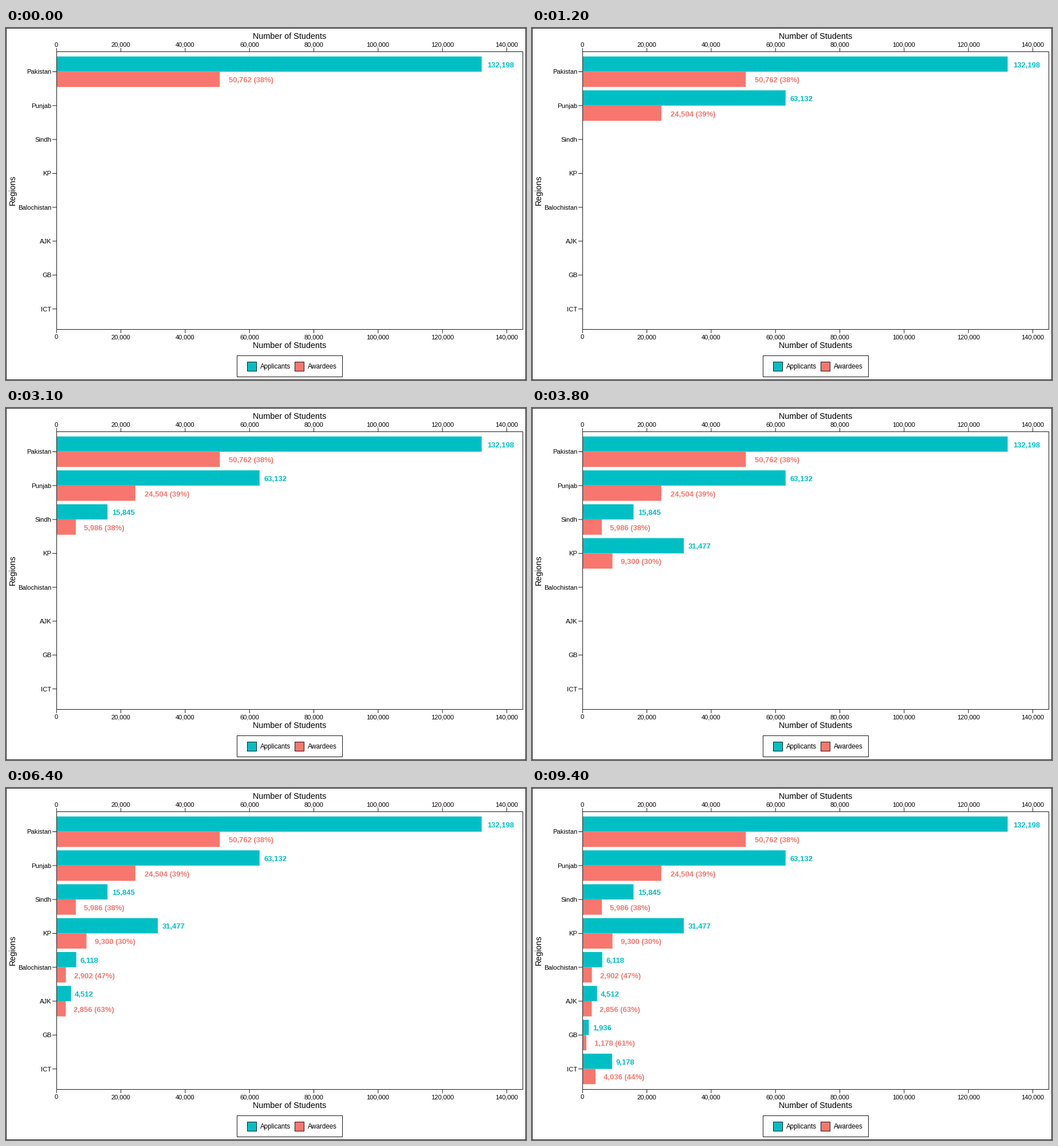
A matplotlib script that plays this animation: 908 by 616 pixels, repeating every 10000 ms.

```python
import matplotlib.pyplot as plt
from matplotlib.animation import FuncAnimation
from matplotlib.patches import Rectangle

WIDTH, HEIGHT, DPI = 908, 616, 64
PX = 72 / DPI  # points per pixel
TEAL, RED, INK = "#00BFC4", "#F8766D", "#1a1a1a"

LEFT, RIGHT, TOP, BOTTOM = 88.5, 902.5, 41.5, 527.5
X_ZERO, X_STEP = 88.3, 112.3  # pixels per 20,000 students
ROW_FIRST, ROW_STEP = 76.5, 59.3
BAR = 0.45 * ROW_STEP

# region, applicants, awardees, share, time of appearance in tenths of a second
ROWS = [
    ("Pakistan", 132198, 50762, 38, 0),
    ("Punjab", 63132, 24504, 39, 12),
    ("Sindh", 15845, 5986, 38, 25),
    ("KP", 31477, 9300, 30, 38),
    ("Balochistan", 6118, 2902, 47, 51),
    ("AJK", 4512, 2856, 63, 64),
    ("GB", 1936, 1178, 61, 76),
    ("ICT", 9178, 4036, 44, 88),
]

plt.rcParams["font.family"] = "Liberation Sans"
plt.rcParams["path.snap"] = False  # pixel centres are given explicitly
fig = plt.figure(figsize=(WIDTH / DPI, HEIGHT / DPI), dpi=DPI, facecolor="white")
ax = fig.add_axes([0, 0, 1, 1])
ax.set(xlim=(0, WIDTH), ylim=(HEIGHT, 0))
ax.axis("off")


def x_of(value):
    return X_ZERO + value / 20000 * X_STEP


def text(x, baseline, label, size, ha="center", color="black", **kwargs):
    return ax.text(x, baseline, label, fontsize=size * PX, ha=ha,
                   va="baseline", color=color, **kwargs)


def box(x0, y0, x1, y1, face="none"):
    ax.add_patch(Rectangle((x0, y0), x1 - x0, y1 - y0, facecolor=face,
                           edgecolor=INK, linewidth=PX, zorder=3, snap=False))


def line(x0, y0, x1, y1):
    ax.plot([x0, x1], [y0, y1], color=INK, lw=PX, solid_capstyle="butt", snap=False)


def bar(value, top, color, baseline, label):
    """Bar with its label one fifth of the label's width past the end."""
    end = x_of(value)
    patch = ax.add_patch(Rectangle((X_ZERO, top), end - X_ZERO, BAR, facecolor=color,
                                   linewidth=0, zorder=1, snap=False))
    tag = text(end, baseline, label, 13, "left", color, weight="bold")
    tag.set_x(end + 0.2 * tag.get_window_extent().width)
    return [patch, tag]


def draw_frame_and_axes():
    box(0.5, 0.5, WIDTH - 0.5, HEIGHT - 0.5)
    box(LEFT, TOP, RIGHT, BOTTOM)
    middle = (LEFT + RIGHT) / 2
    text(middle, 19, "Number of Students", 14.35)
    text(middle, 560, "Number of Students", 14.35)
    text(16, 283.5, "Regions", 14.4, rotation=90, rotation_mode="anchor")
    for value in range(0, 140001, 20000):
        x = x_of(value)
        line(x, 35, x, TOP)
        line(x, BOTTOM, x, 534)
        text(x - 0.3, 33, f"{value:,}", 11.1)
        text(x - 0.3, 544, f"{value:,}", 11.1)


def draw_legend():
    box(403.5, 573.5, 587.5, 610.5)
    for x, color, label in ((421.5, TEAL, "Applicants"), (504.5, RED, "Awardees")):
        box(x, 584.5, x + 16, 600.5, face=color)
        text(x + 22.5, 596, label, 11.5, "left")


def draw_row(index, region, applicants, awardees, share):
    y = ROW_FIRST + index * ROW_STEP
    line(81, y, LEFT, y)
    text(79.5, y + 4, region, 11.2, "right")
    return (bar(applicants, y - BAR, TEAL, y - 7.9, f"{applicants:,}")
            + bar(awardees, y, RED, y + 18.8, f"{awardees:,} ({share}%)"))


draw_frame_and_axes()
draw_legend()
groups = [(row[4], draw_row(i, *row[:4])) for i, row in enumerate(ROWS)]


def update(frame):
    for start, artists in groups:
        for artist in artists:
            artist.set_visible(frame >= start)
    return [artist for _, artists in groups for artist in artists]


anim = FuncAnimation(fig, update, frames=100, interval=100, repeat=True,
                     repeat_delay=0, init_func=lambda: update(0))
plt.show()
```
